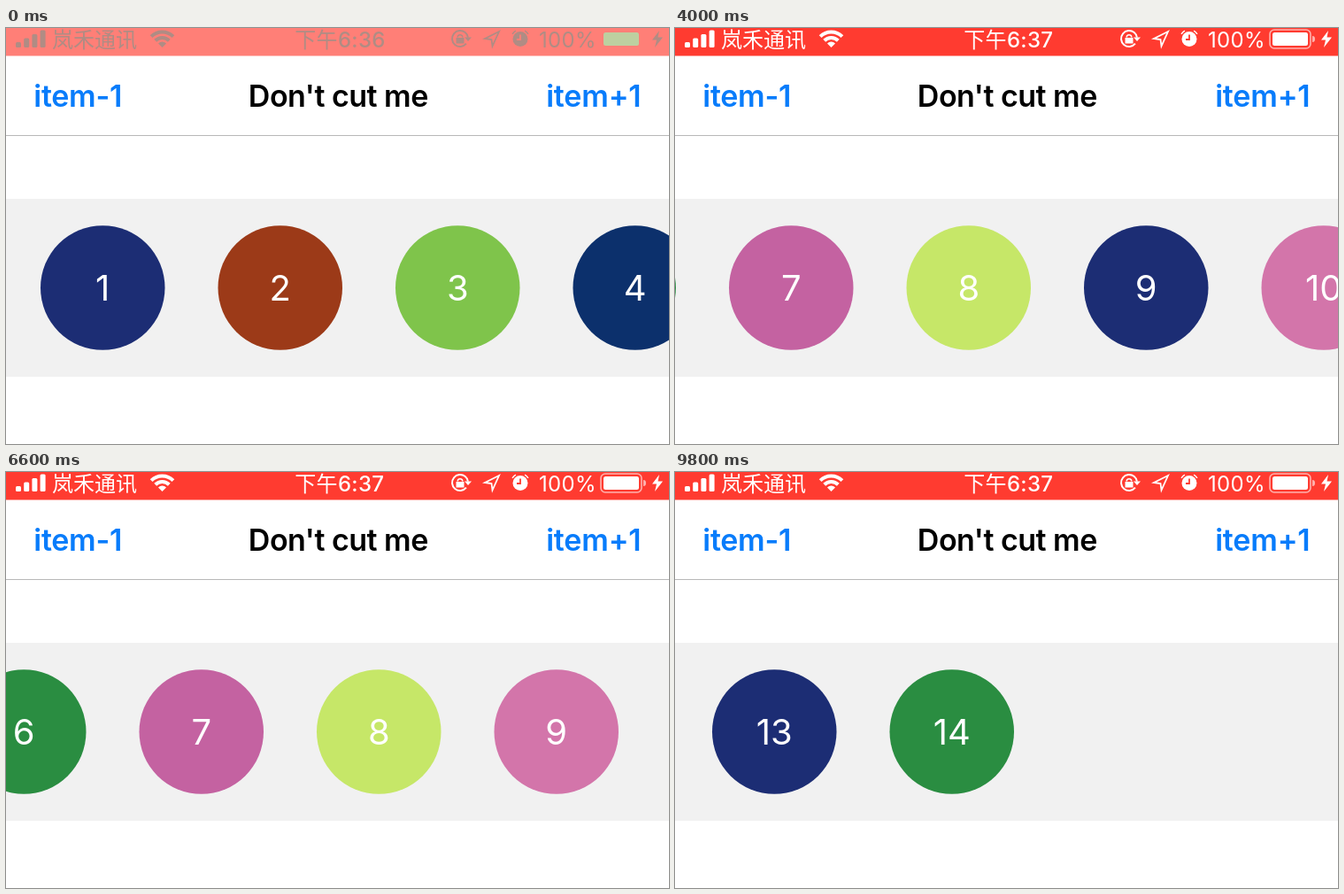
Animation of 749x470 px, one loop 9.9 s. Source, as an HTML page with a canvas:

```html
<!DOCTYPE html>
<html lang="zh-CN">
<head>
<meta charset="utf-8">
<style>
html, body { margin: 0; width: 100%; height: 100%; overflow: hidden; background: #fff; }
canvas { display: block; }
</style>
</head>
<body>
<canvas id="stage" width="749" height="470"></canvas>
<script>
const ctx = document.getElementById('stage').getContext('2d');
const LOOP = 9900, STEP = 100, PITCH = 200.5, ITEMS = 14;
const FONT = "Inter, 'Noto Sans CJK SC', 'Noto Sans CJK', sans-serif";

const navy = '#1c2d74', brown = '#9c3a18', grass = '#7fc44b', blue = '#0c306c', mint = '#52f1ba',
      forest = '#2a8d41', orchid = '#c462a1', lime = '#c6e768', pink = '#d375aa';
const firstColors = [navy, brown, grass, blue, mint, forest, orchid, lime, navy, pink, grass, brown, navy, forest];
// Recycled cells come back with other colours.
const recolors = [
  { at: 4900, cells: { 4: brown, 5: blue } },
  { at: 6400, cells: { 9: pink, 10: mint } }
];

// Each swipe moves one page of three items: a short drag, then an exponential settle.
const swipes = [
  { start: 1707, dir: 1, rate: 15 },
  { start: 3553, dir: 1, rate: 15 },
  { start: 4845, dir: -1, rate: 15 },
  { start: 6307, dir: 1, rate: 15 },
  { start: 7596, dir: 1, rate: 15 },
  { start: 9042, dir: 1, rate: 12.2 }
];

// Status bar fading in: bar, foreground, battery fill, battery outline
const barStages = [
  ['#ff7f77', '#b08c84', '#bdd0a0', 'rgba(255,255,255,0)'],
  ['#ff5046', '#e6c4be', '#ecdccb', 'rgba(255,255,255,.3)'],
  ['#ff3b30', '#fff', '#fff', 'rgba(255,255,255,.6)']
];

function scrollAt(t) {
  let pages = 0;
  for (const { start, dir, rate } of swipes) {
    const x = rate * Math.max(0, t - start) / 1000;
    pages += dir * (1 - (1 + x + x * x / 2) * Math.exp(-x));
  }
  return Math.round(pages * 3 * PITCH * 2) / 2;
}

function colorAt(n, t) {
  let color = firstColors[n - 1];
  for (const { at, cells } of recolors) if (t >= at && cells[n]) color = cells[n];
  return color;
}

function rect(x, y, w, h, color) {
  ctx.fillStyle = color;
  ctx.fillRect(x, y, w, h);
}

function roundRect(x, y, w, h, r) {
  ctx.beginPath();
  ctx.roundRect(x, y, w, h, r);
}

function disc(x, y, r, color) {
  ctx.fillStyle = color;
  ctx.beginPath();
  ctx.arc(x, y, r, 0, 2 * Math.PI);
  ctx.fill();
}

function arc(x, y, r, from, to, width) {
  ctx.lineWidth = width;
  ctx.beginPath();
  ctx.arc(x, y, r, from * Math.PI, to * Math.PI);
  ctx.stroke();
}

function path(points, close) {
  ctx.beginPath();
  points.forEach(([x, y]) => ctx.lineTo(x, y));
  if (close) ctx.closePath();
}

function text(str, x, y, size, weight, color, align = 'left', spacing = 0) {
  ctx.font = `${weight} ${size}px ${FONT}`;
  ctx.letterSpacing = spacing + 'px';
  ctx.textAlign = align;
  ctx.fillStyle = color;
  ctx.fillText(str, x, y);
}

function drawStatusBar(t) {
  const [bar, fg, fill, outline] = barStages[Math.min(2, Math.floor(t / STEP))];
  rect(0, 0, 749, 31.5, bar);
  ctx.strokeStyle = fg;

  for (let i = 0; i < 4; i++) {
    const h = 6 + i * 4.5;
    ctx.fillStyle = fg;
    roundRect(11 + i * 9.2, 22 - h, 6, h, 1.5);
    ctx.fill();
  }
  text('岚禾通讯', 52, 21.5, 24, 400, fg);

  arc(176.5, 22, 17.5, 1.25, 1.75, 4);
  arc(176.5, 22, 11, 1.25, 1.75, 4);
  arc(176.5, 22, 3.2, 1.25, 1.75, 6.4);

  text('下午' + (t < 900 ? '6:36' : '6:37'), 326.3, 21.5, 24, 500, fg, 'left', 0.3);

  // Rotation lock
  arc(513, 12, 9, 0.22, 1.95, 2);
  rect(508.5, 11, 9, 6.5, fg);
  arc(513, 10.5, 2.8, 1, 2, 1.6);
  path([[518, 10.5], [526, 10.5], [522, 15]], true);
  ctx.fill();

  // Location
  path([[557, 4], [541, 12], [548.5, 13], [549.5, 20.5]], true);
  ctx.lineWidth = 1.8;
  ctx.stroke();

  // Alarm
  disc(581, 12.5, 8.5, fg);
  arc(581, 12.5, 10.6, 1.18, 1.34, 1.5);
  arc(581, 12.5, 10.6, 1.66, 1.82, 1.5);
  path([[581, 7.5], [581, 13], [577, 13]]);
  ctx.strokeStyle = bar;
  ctx.lineWidth = 1.8;
  ctx.stroke();

  text('100%', 602, 21.5, 24, 400, fg, 'left', 0.3);

  // Battery
  ctx.strokeStyle = outline;
  ctx.lineWidth = 1.6;
  roundRect(672, 2, 46, 21, 5);
  ctx.stroke();
  ctx.fillStyle = fill;
  roundRect(675, 5, 40, 15, 2.5);
  ctx.fill();
  ctx.fillStyle = outline;
  roundRect(720, 9, 3, 7, [0, 3, 3, 0]);
  ctx.fill();
  ctx.fillStyle = fg;
  path([[738, 3], [730, 13.5], [735, 13.5], [733, 22], [742, 10.5], [736.5, 10.5]], true);
  ctx.fill();
}

function drawNavBar() {
  const link = '#087cfb';
  text('item-1', 31.3, 89, 34, 600, link, 'left', -0.3);
  text("Don't cut me", 375.3, 89, 34, 600, '#000', 'center', -0.52);
  text('item+1', 717.5, 89, 34, 600, link, 'right', -0.2);
  rect(0, 121, 749, 1, '#b8b8b8');
}

function drawList(t) {
  rect(0, 193, 749, 201, '#f1f1f1');
  const scroll = scrollAt(t);
  for (let n = 1; n <= ITEMS; n++) {
    const x = 109.25 + (n - 1) * PITCH - scroll;
    if (x < -71 || x > 820) continue;
    disc(x, 293.5, 70.25, colorAt(n, t));
    text(n, x, 308, 40, 400, '#fff', 'center');
  }
}

function draw(now) {
  const t = Math.floor((now % LOOP) / STEP) * STEP;
  rect(0, 0, 749, 470, '#fff');
  drawStatusBar(t);
  drawNavBar();
  drawList(t);
}

const start = performance.now();
function tick() {
  draw(performance.now() - start);
  requestAnimationFrame(tick);
}
tick();
</script>
</body>
</html>
```
